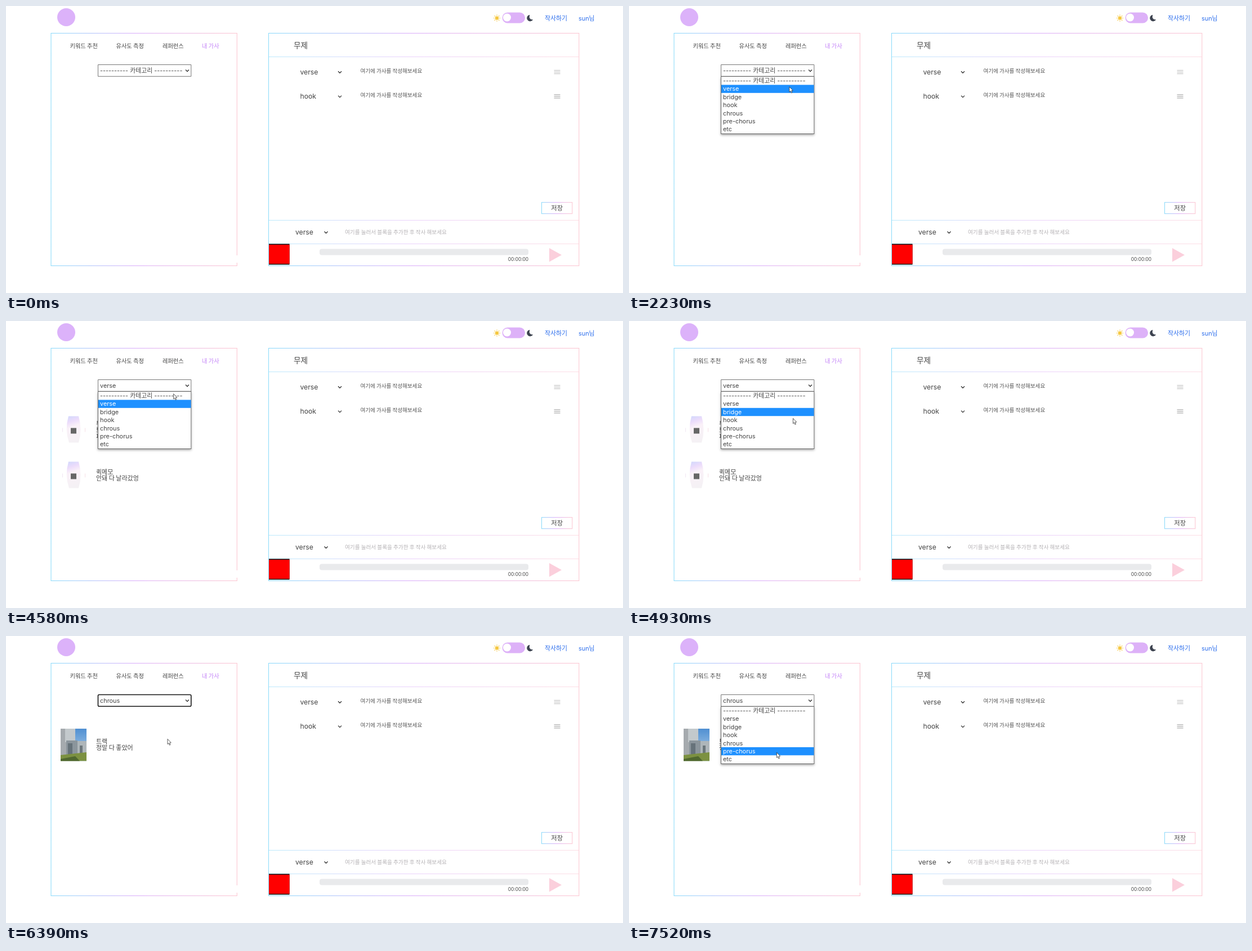
Animation of 1096x511 px, one loop 8 s. Source, as an HTML page with a canvas:

```html
<!DOCTYPE html>
<html lang="ko">
<head>
<meta charset="utf-8">
<title>작사 에디터</title>
<style>
  html, body { margin: 0; width: 100%; height: 100%; overflow: hidden; background: #fff; }
  canvas { display: block; width: 1096px; height: 511px; }
</style>
</head>
<body>
<canvas id="stage"></canvas>
<script>
const W = 1096, H = 511, LOOP = 8000;
const canvas = document.getElementById('stage');
const dpr = window.devicePixelRatio || 1;
canvas.width = W * dpr;
canvas.height = H * dpr;
const c = canvas.getContext('2d');

const KO = '"Noto Sans CJK KR", "Noto Sans CJK", sans-serif';
const MIX = 'Inter, "Noto Sans CJK KR", "Noto Sans CJK", sans-serif';
const INK = '#444';
const CYAN = '#8fdcfa', LILAC = '#dcb2fa', PINK = '#fcc8d2';

const OPTIONS = ['---------- 카테고리 ----------', 'verse', 'bridge', 'hook', 'chrous', 'pre-chorus', 'etc'];
const MENU_TOP = 126, ROW = 14.4;
const OPEN = [[1480, 2640], [3920, 5790], [7060, LOOP]];
const CLICKS = [[1410, 1550], [2570, 2640], [3920, 3980], [5660, 5790], [7060, 7130]];

// Pointer moves: start, step length, keys of [time, x, y]
const MOVES = [
  [460, 69, [[460, 934, 424], [736, 610, 210], [1012, 310, 64], [1081, 275, 84], [1219, 286, 110]]],
  [1950, 70, [[1880, 286, 110], [2160, 285, 141.5], [2230, 284.5, 143.5], [2370, 282, 151]]],
  [3260, 63, [[3197, 282, 151], [3449, 296, 123]]],
  [3650, 70, [[3650, 298.5, 120.5]]],
  [4580, 68, [[4512, 298.5, 120.5], [4920, 291, 173], [5328, 283, 195.5]]],
  [6390, 80, [[6310, 283, 195.5], [6870, 308, 108]]],
  [7280, 60, [[7220, 308, 108], [7400, 266, 199], [7520, 262, 207]]]
];

const within = (spans, t) => spans.some(([a, b]) => t >= a && t < b);

function pointer(t) {
  const move = MOVES.filter(m => m[0] <= t).pop();
  if (!move) return null;
  const [start, step, keys] = move;
  const q = start + Math.floor((t - start) / step) * step;
  const i = keys.findIndex(k => k[0] >= q);
  if (i < 0) return keys[keys.length - 1].slice(1);
  if (i === 0) return keys[0].slice(1);
  const a = keys[i - 1], b = keys[i], p = (q - a[0]) / (b[0] - a[0]);
  return [a[1] + (b[1] - a[1]) * p, a[2] + (b[2] - a[2]) * p];
}

function text(s, x, cy, size, color = INK, font = KO, weight = 400, align = 'left') {
  c.font = `${weight} ${size}px ${font}`;
  c.textAlign = align;
  c.fillStyle = color;
  c.fillText(s, x, cy + size * 0.37);
}

function rect(x, y, w, h, color) {
  c.fillStyle = color;
  c.fillRect(x, y, w, h);
}

function disc(x, y, r, color) {
  c.fillStyle = color;
  c.beginPath();
  c.arc(x, y, r, 0, Math.PI * 2);
  c.fill();
}

function pill(x, y, w, h, r, color) {
  c.fillStyle = color;
  c.beginPath();
  c.roundRect(x, y, w, h, r);
  c.fill();
}

function poly(points, fill) {
  c.beginPath();
  points.forEach(([x, y]) => c.lineTo(x, y));
  c.closePath();
  c.fillStyle = fill;
  c.fill();
}

function line(x1, y1, x2, y2, color, width = 1) {
  c.strokeStyle = color;
  c.lineWidth = width;
  c.beginPath();
  c.moveTo(x1, y1);
  c.lineTo(x2, y2);
  c.stroke();
}

function rainbow(x1, x2) {
  const g = c.createLinearGradient(x1, 0, x2, 0);
  g.addColorStop(0, CYAN);
  g.addColorStop(0.45, LILAC);
  g.addColorStop(1, PINK);
  return g;
}

function frame(x, y, w, h) {
  c.strokeStyle = rainbow(x, x + w);
  c.lineWidth = 1.1;
  c.strokeRect(x, y, w, h);
}

function chevron(x, y) {
  c.strokeStyle = '#333';
  c.lineWidth = 1.3;
  c.beginPath();
  c.moveTo(x - 3, y - 1.5);
  c.lineTo(x, y + 1.5);
  c.lineTo(x + 3, y - 1.5);
  c.stroke();
}

function header() {
  disc(107, 20, 16, LILAC);
  disc(872, 21.5, 3.2, '#f5c842');
  for (let i = 0; i < 8; i++) {
    const a = i * Math.PI / 4, x = Math.cos(a), y = Math.sin(a);
    line(872 + x * 4.3, 21.5 + y * 4.3, 872 + x * 6, 21.5 + y * 6, '#f5c842', 1.2);
  }
  pill(881.5, 11.5, 40.5, 19, 9.5, '#ddb1f8');
  disc(890, 20.5, 7, '#fff');
  c.fillStyle = '#3d4350';
  c.beginPath();
  c.arc(931, 21.5, 5.8, -1.7, 0.5, true);
  c.quadraticCurveTo(928, 24.5, 930.3, 15.7);
  c.fill();
  text('작사하기', 957, 22, 10.9, '#2a6cec');
  text('sun님', 1017, 22, 10.9, '#2a6cec', MIX);
}

function editor() {
  frame(466.5, 48.5, 551.3, 414);
  c.globalAlpha = 0.6;
  for (const y of [90.5, 381.5, 423.5]) line(467, y, 1017.5, y, rainbow(467, 1018));
  c.globalAlpha = 1;
  text('무제', 511, 70, 13.6);

  ['verse', 'hook'].forEach((kind, i) => {
    const y = 117.6 + i * 43.3;
    text(kind, 522.5, y, 12.2, INK, MIX);
    chevron(593, y + 0.2);
    text('여기에 가사를 작성해보세요', 629.5, y - 2.6, 9.55, '#555');
    for (const d of [-3, 0, 3]) line(973.5, y + d, 984.5, y + d, i ? '#999' : '#b5b5b5');
  });

  frame(951.5, 349.7, 54.3, 20);
  text('저장', 968.3, 360, 11.3);
  text('verse', 514, 402.5, 12.2, INK, MIX);
  chevron(568.5, 403);
  text('여기를 눌러서 블록을 추가한 후 작사 해보세요', 602, 402, 9.62, '#b5b2b5');

  rect(467, 423.5, 36.6, 37, '#111');
  rect(467, 425, 36.6, 34, '#f00');
  pill(557, 432.5, 371, 11, 4, '#e9eaec');
  text('00:00:00', 928, 451, 8.3, INK, MIX, 400, 'right');
  poly([[965, 431], [987, 443.3], [965, 455.5]], '#fbcfdc');
}

function can(cy) {
  const g = c.createLinearGradient(110, cy - 24, 126, cy + 22);
  g.addColorStop(0, '#d2d8fc');
  g.addColorStop(0.22, '#ecdcfb');
  g.addColorStop(0.42, '#faf1f8');
  g.addColorStop(1, '#f4f1f4');
  c.fillStyle = g;
  c.beginPath();
  c.moveTo(111, cy - 24);
  c.lineTo(129, cy - 24);
  c.quadraticCurveTo(136, cy, 129, cy + 23);
  c.lineTo(112, cy + 23);
  c.quadraticCurveTo(104, cy, 111, cy - 24);
  c.fill();
  rect(115, cy - 3, 10, 10, '#666');
  line(100.5, cy - 3, 100.5, cy + 4, '#f0e6f2');
  line(140.5, cy - 3, 140.5, cy + 4, '#f6e0e6');
}

function photo(x, y) {
  const sky = c.createLinearGradient(0, y, 0, y + 46);
  sky.addColorStop(0, '#4f8fd2');
  sky.addColorStop(1, '#a9cbe8');
  c.fillStyle = sky;
  c.fillRect(x, y, 46, 57.5);
  rect(x, y, 10, 48, '#a5aaae');
  rect(x + 8, y, 18, 24, '#c3c9cc');
  rect(x + 10, y + 21, 20, 27, '#8b959c');
  rect(x + 13, y + 26, 8, 23, '#66727a');
  rect(x + 30, y + 22, 16, 22, '#aeb6ba');
  rect(x + 34, y + 30, 5, 14, '#6c777c');
  poly([[x, y + 47], [x + 46, y + 42], [x + 46, y + 57.5], [x, y + 57.5]], '#7c9141');
  poly([[x, y + 54], [x + 26, y + 49], [x + 34, y + 57.5], [x, y + 57.5]], '#50682f');
}

function lyrics(value) {
  const lines = (list, y) => list.forEach((s, i) => text(s, 160, y + i * 11.6, 11));
  if (value === 1) {
    can(193.5);
    lines(['무제', '보이지 않니 나의 뒤에 숨어서 파도를', '피해 잠을 자고 있잖아'], 182.5);
    can(274.5);
    lines(['퀵메모', '안돼 다 날라갔엉'], 268.5);
  } else if (value === 4) {
    photo(97, 165);
    lines(['트랙', '정말 다 좋았어'], 187.5);
  }
}

function select(value, ring) {
  c.fillStyle = '#fff';
  c.strokeStyle = ring ? '#151515' : '#767676';
  c.lineWidth = ring ? 1.6 : 1;
  c.beginPath();
  c.roundRect(163.5, 104.5, 165.3, 20.8, ring ? 2 : 0);
  c.fill();
  c.stroke();
  text(OPTIONS[value], 167, 115, 10.9, INK, MIX);
  chevron(322, 115);
}

function menu(active) {
  c.save();
  c.shadowColor = 'rgba(0,0,0,.35)';
  c.shadowBlur = 4 * dpr;
  c.shadowOffsetY = 1.5 * dpr;
  rect(163, 125, 166.3, 103, '#fff');
  c.restore();
  c.strokeStyle = '#666';
  c.lineWidth = 1;
  c.strokeRect(163.5, 125.5, 165.3, 102);
  rect(164, MENU_TOP + active * ROW, 164.5, ROW, '#1e90ff');
  OPTIONS.forEach((s, i) => text(s, 167, 133 + i * ROW, 10.9, i === active ? '#fff' : INK, MIX));
}

function cursor([x, y]) {
  c.save();
  c.translate(x, y);
  poly([[0.4, 0.4], [0.4, 9.6], [2.4, 7.8], [3.9, 11.3], [5.4, 10.6], [4, 7.3], [6.7, 7]], '#fff');
  c.strokeStyle = '#333';
  c.lineWidth = 0.8;
  c.stroke();
  c.restore();
}

function draw(t) {
  c.setTransform(dpr, 0, 0, dpr, 0, 0);
  rect(0, 0, W, H, '#fff');
  header();
  editor();

  frame(80, 48.5, 330.3, 414);
  rect(408, 444, 5, 13, '#fff');
  text('키워드 추천', 113.5, 71, 10.25);
  text('유사도 측정', 195.5, 71, 10.25);
  text('레퍼런스', 278, 71, 10.25);
  text('내 가사', 348, 71, 10.25, '#d8aefa', KO, 700);

  const value = t < 2640 ? 0 : t < 5790 ? 1 : 4;
  const open = within(OPEN, t);
  const tip = pointer(t);
  lyrics(value);
  select(value, !open && t >= 2640);
  if (open) {
    // The highlight trails the pointer by one step
    const row = Math.floor((pointer(t - 65)[1] - MENU_TOP) / ROW);
    menu(row < 0 ? value : Math.min(row, OPTIONS.length - 1));
  }
  if (!tip) return;
  if (within(CLICKS, t)) disc(tip[0], tip[1] + 0.5, 9.3, 'rgba(255,242,30,.65)');
  cursor(tip);
}

const began = performance.now();
function tick() {
  draw((performance.now() - began) % LOOP);
  requestAnimationFrame(tick);
}
tick();
</script>
</body>
</html>
```
